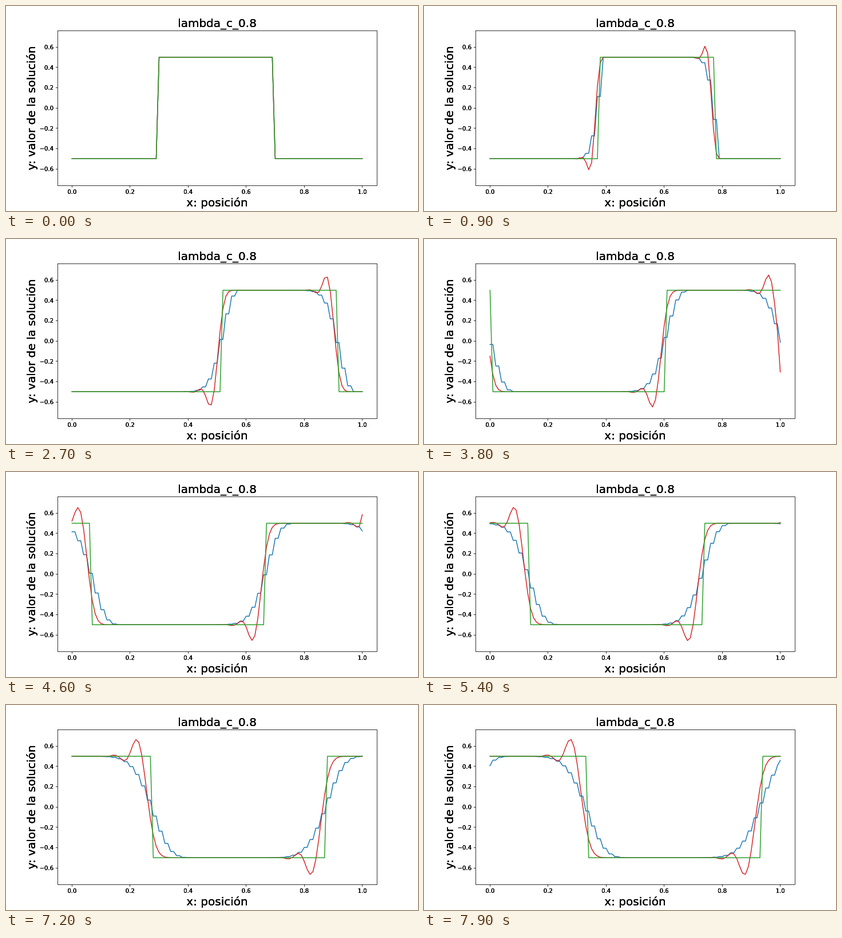
Recreate the animation shown at these times as an HTML page with a canvas. Size 720 by 360 pixels, loop 8000 ms.

```html
<!DOCTYPE html>
<html lang="es">
<head>
<meta charset="utf-8">
<title>lambda_c_0.8</title>
<style>
  html, body { margin: 0; width: 720px; height: 360px; overflow: hidden; background: #fff; }
  canvas { display: block; }
</style>
</head>
<body>
<canvas id="plot" width="720" height="360"></canvas>
<script>
const ctx = document.getElementById('plot').getContext('2d');
const STEPS = 80, STEP_MS = 100;
const CELLS = 100, NU = 0.8;
const BOX = { left: 90, right: 648, top: 43.2, bottom: 315 };
const FONT = '"DejaVu Sans", sans-serif';

const px = x => 115.36 + 507.27 * x;
const py = y => 179.1 - 178.2 * y;
const wrap = j => ((j % CELLS) + CELLS) % CELLS;

// Square pulse carried along by the exact solution
function exact(n) {
  const shift = Math.ceil(NU * n - 1e-9);
  return Array.from({ length: CELLS + 1 }, (_, j) => {
    const k = wrap(j - shift);
    return k >= 30 && k < 70 ? 0.5 : -0.5;
  });
}

// Periodic three-point scheme; the end point trails the first by one step
function solve(wLeft, wMid, wRight) {
  const rows = [exact(0)];
  while (rows.length < STEPS) {
    const u = rows[rows.length - 1];
    const next = [];
    for (let j = 0; j < CELLS; j++) {
      next.push(wLeft * u[wrap(j - 1)] + wMid * u[j] + wRight * u[wrap(j + 1)]);
    }
    next.push(u[0]);
    rows.push(next);
  }
  return rows;
}

const friedrichs = solve((1 + NU) / 2, 0, (1 - NU) / 2);
const wendroff = solve(NU * (1 + NU) / 2, 1 - NU * NU, NU * (NU - 1) / 2);

function curve(u, color) {
  ctx.strokeStyle = color;
  ctx.lineWidth = 1.5;
  ctx.lineJoin = 'round';
  ctx.lineCap = 'square';
  ctx.beginPath();
  u.forEach((v, j) => ctx.lineTo(px(j / CELLS), py(v)));
  ctx.stroke();
}

// Repeated passes give the text its heavy edges
function label(text, x, y, size, align = 'center', angle = 0) {
  ctx.save();
  ctx.translate(x, y);
  ctx.rotate(angle);
  ctx.font = size + 'px ' + FONT;
  ctx.textAlign = align;
  ctx.fillStyle = '#000';
  for (let i = 0; i < 3; i++) ctx.fillText(text, 0, 0);
  ctx.restore();
}

function line(x1, y1, x2, y2) {
  ctx.beginPath();
  ctx.moveTo(x1, y1);
  ctx.lineTo(x2, y2);
  ctx.stroke();
}

function axes() {
  ctx.strokeStyle = '#000';
  ctx.lineWidth = 0.8;
  ctx.lineCap = 'butt';
  ctx.lineJoin = 'miter';
  ctx.strokeRect(90.5, 43.5, 558, 272);
  for (let i = 0; i <= 5; i++) {
    const x = px(i / 5);
    const sx = Math.floor(x) + 0.5;
    line(sx, 315.5, sx, 319);
    label((i / 5).toFixed(1), x, 330, 10);
  }
  for (let i = -3; i <= 3; i++) {
    const y = py(i / 5);
    const sy = Math.floor(y) + 0.5;
    line(87, sy, 90.5, sy);
    label((i < 0 ? '\u2212' : '') + Math.abs(i / 5).toFixed(1), 83, y + 3.8, 10, 'right');
  }
  label('lambda_c_0.8', 369, 37, 20);
  label('x: posición', 369, 352, 20);
  label('y: valor de la solución', 51, 179.5, 20, 'center', -Math.PI / 2);
}

function draw() {
  const n = Math.floor(performance.now() / STEP_MS) % STEPS;
  ctx.fillStyle = '#fff';
  ctx.fillRect(0, 0, 720, 360);
  ctx.save();
  ctx.beginPath();
  ctx.rect(BOX.left, BOX.top, BOX.right - BOX.left, BOX.bottom - BOX.top);
  ctx.clip();
  curve(friedrichs[n], '#1f77b4');
  curve(wendroff[n], '#d62728');
  curve(exact(n), '#2ca02c');
  ctx.restore();
  axes();
  requestAnimationFrame(draw);
}
draw();
</script>
</body>
</html>
```
